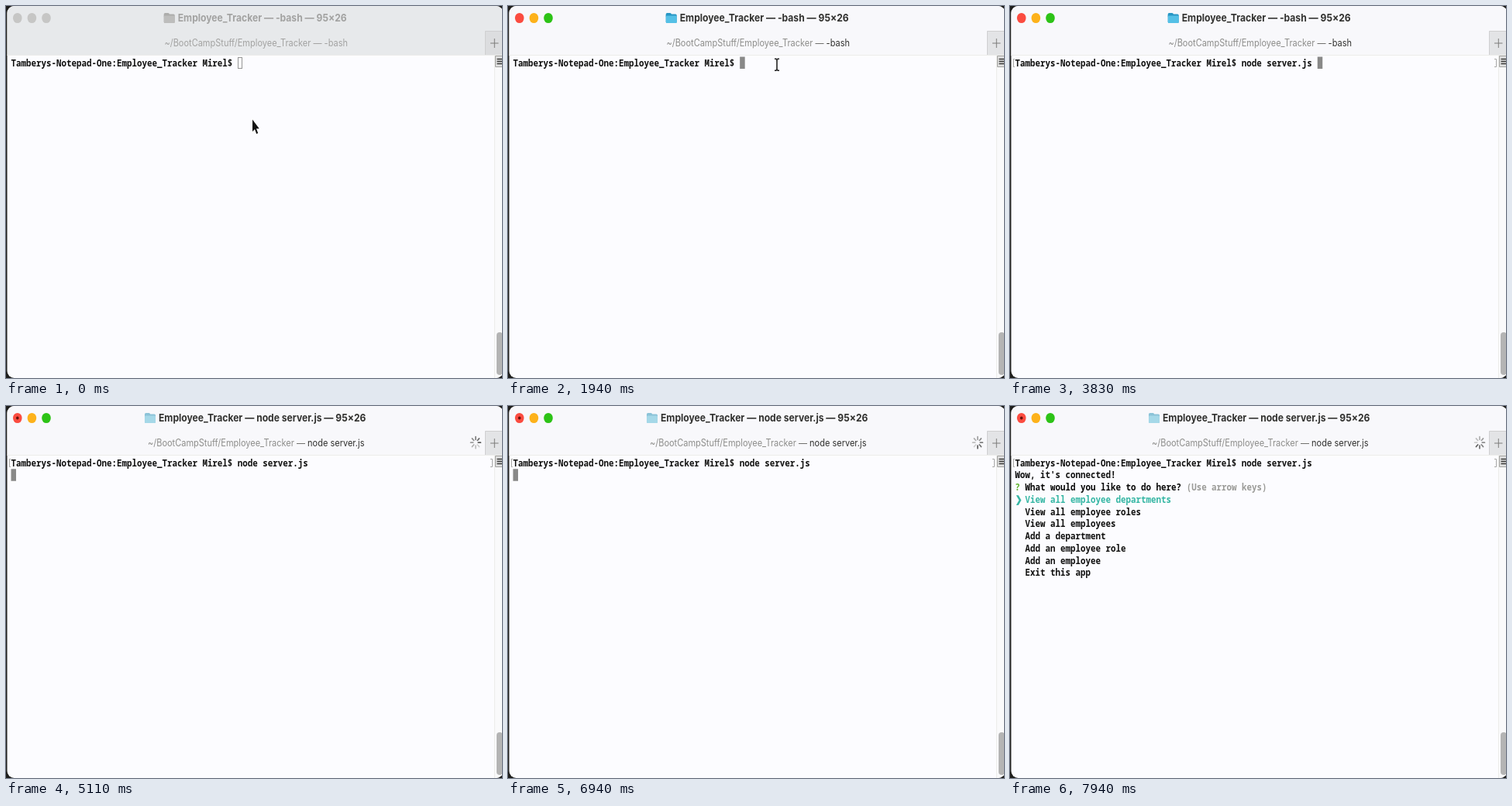
Write an HTML page with a canvas that moves like this. It is 640 by 480 pixels and loops after 8 s.

```html
<!DOCTYPE html>
<html lang="en">
<head>
<meta charset="utf-8">
<title>Terminal</title>
<style>
  html, body { margin: 0; width: 100%; height: 100%; overflow: hidden; background: #1e1e1c; }
  canvas { display: block; }
</style>
</head>
<body>
<canvas id="stage" width="640" height="480"></canvas>
<script>
const ctx = document.getElementById('stage').getContext('2d');
const LOOP = 8000;
const FOCUS = 1060, ENTER = 3830, NEWLINE = 3940, RUN = 4500, MENU = 7330;

const ASPECT = 1.13;
const CELL = 6.504, ROW = 15.75, LEFT = 6.5, TOP = 65.5;
const MONO = '600 10.84px "Noto Sans Mono", monospace';
const MONO_BOLD = '800 10.84px "Noto Sans Mono", monospace';
const TITLE = '700 12.12px Inter, sans-serif';
const TAB = '400 11px Inter, sans-serif';
const INK = '#111110', DIM = '#a3a3a2';

const PROMPT = 'Tamberys-Notepad-One:Employee_Tracker Mirel$ ';
const KEYS = [
  [2230, 'n'], [2420, 'no'], [2600, 'nod'], [2780, 'node'], [2890, 'node '],
  [3060, 'node s'], [3200, 'node se'], [3330, 'node ser'], [3500, 'node server.js ']
];
const CHOICES = [
  'View all employee departments', 'View all employee roles', 'View all employees',
  'Add a department', 'Add an employee role', 'Add an employee', 'Exit this app'
];

function text(str, x, y, font, color) {
  ctx.save();
  ctx.translate(x, y);
  ctx.scale(1, ASPECT);
  ctx.font = font;
  ctx.fillStyle = color;
  ctx.fillText(str, 0, 0);
  ctx.restore();
}

function widthOf(str, font) {
  ctx.font = font;
  return ctx.measureText(str).width;
}

function cells(str, col, row, color = INK, font = MONO) {
  text(str, LEFT + col * CELL, 77.7 + row * ROW, font, color);
}

function rect(x, y, w, h, color) {
  ctx.fillStyle = color;
  ctx.fillRect(x, y, w, h);
}

function round(x, y, w, h, r, color) {
  ctx.fillStyle = color;
  ctx.beginPath();
  ctx.roundRect(x, y, w, h, r);
  ctx.fill();
}

function line(points, color, width = 1) {
  ctx.strokeStyle = color;
  ctx.lineWidth = width;
  ctx.beginPath();
  points.forEach(([x, y]) => ctx.lineTo(x, y));
  ctx.stroke();
}

function oval(x, y, rx, ry, color) {
  ctx.fillStyle = color;
  ctx.beginPath();
  ctx.ellipse(x, y, rx, ry, 0, 0, Math.PI * 2);
  ctx.fill();
}

function folder(x, dark, light) {
  round(x, 9, 7, 6, 1.5, dark);
  round(x, 10.5, 14, 11.5, 1.5, dark);
  round(x, 12.5, 14, 9.5, 1.5, light);
}

function header(active, running) {
  rect(0, 0, 640, 64, active ? '#f8f8fb' : '#e7e9eb');
  rect(618, 32, 22, 32, active ? '#e3e4e6' : '#dcdddf');
  line([[640, 32.5], [618.5, 32.5], [618.5, 64]], '#cfcfd0');
  line([[0, 63.5], [640, 63.5]], '#ececea');
  line([[625, 48], [635.5, 48]], '#7c7c7b');
  line([[630.3, 42], [630.3, 54]], '#7c7c7b');

  const lights = active ? ['#fb4c40', '#fdb21b', '#2dc316'] : Array(3).fill('#c6c6c5');
  lights.forEach((color, i) => oval(14.8 + i * 18.6, 15.5, 5.8, 6.6, color));
  if (running) oval(14.8, 15.5, 1.8, 2, '#67120b');

  const job = running ? 'node server.js' : '-bash';
  const title = `Employee_Tracker — ${job} — 95×26`;
  const titleX = 330.7 - widthOf(title, TITLE) / 2;
  text(title, titleX, 20.3, TITLE, active ? '#333331' : DIM);
  if (!active) folder(titleX - 18, '#adadac', '#bdbdbc');
  else if (running) folder(titleX - 18, '#8cc3d8', '#a5d8e8');
  else folder(titleX - 18, '#2897c5', '#55c0e6');

  const path = '~/BootCampStuff/Employee_Tracker ', tail = '— ';
  const pathW = widthOf(path, TAB), tailW = widthOf(tail, TAB);
  const tabX = 322.7 - (pathW + tailW + widthOf(job, TAB)) / 2;
  text(path, tabX, 52.2, TAB, active ? '#8e8e8c' : DIM);
  text(tail, tabX + pathW, 52.2, TAB, active ? '#70706e' : DIM);
  text(job, tabX + pathW + tailW, 52.2, TAB, active ? '#333331' : DIM);
}

function spinner(t) {
  const step = Math.floor(t / 105);
  ctx.lineCap = 'round';
  for (let i = 0; i < 8; i++) {
    const a = i * Math.PI / 4, age = ((step - i) % 8 + 8) % 8;
    const shade = 95 + age * 16;
    const at = r => [606 + Math.cos(a) * r * 0.92, 47.2 + Math.sin(a) * r * 1.08];
    line([at(3.6), at(7)], `rgb(${shade},${shade},${shade})`, 1.7);
  }
  ctx.lineCap = 'butt';
}

function scrollbar() {
  rect(630, 64, 10, 416, '#fafafb');
  line([[630.5, 64], [630.5, 480]], '#ececea');
  rect(631, 64, 9, 14, '#e0e0e0');
  line([[640, 64.5], [631.5, 64.5], [631.5, 78.5], [640, 78.5]], '#a2a2a0');
  for (const y of [68.5, 71.5, 74.5]) line([[633.5, y], [640, y]], '#3a3a38', 1.5);
  round(633, 421, 8, 55, 4, '#b4b4b4');
}

function caret(col, row, active) {
  const x = LEFT + col * CELL, y = TOP + row * ROW;
  if (active) return rect(x, y, CELL, 15.5, '#898988');
  ctx.strokeStyle = '#959594';
  ctx.lineWidth = 1;
  ctx.strokeRect(Math.round(x) + 0.5, Math.round(y) + 0.5, 5, 14);
}

function menu() {
  cells("Wow, it's connected!", 0, 1);
  cells('?', 0, 2, '#5fb52c', MONO_BOLD);
  cells('What would you like to do here?', 2, 2, '#080808', MONO_BOLD);
  cells('(Use arrow keys)', 34, 2, '#9b9b98');
  cells('❯', 0, 3, '#35b6a4');
  CHOICES.forEach((choice, i) => cells(choice, 2, 3 + i, i ? INK : '#35b6a4'));
}

function arrow(x, y) {
  ctx.save();
  ctx.translate(x, y);
  ctx.beginPath();
  [[0, 0], [0, 15.5], [3, 12.5], [5.2, 18.5], [7.2, 17.5], [5, 11.8], [8.8, 11.8]]
    .forEach(([px, py]) => ctx.lineTo(px, py));
  ctx.closePath();
  ctx.strokeStyle = '#fff';
  ctx.lineWidth = 2;
  ctx.stroke();
  ctx.fillStyle = '#111';
  ctx.fill();
  ctx.restore();
}

function beam(x, y) {
  line([[x, y - 6], [x, y + 6]], '#222', 1.6);
  for (const dir of [-1, 1]) {
    const edge = y + dir * 7.5, inner = y + dir * 6;
    line([[x - 3, edge], [x - 1, edge], [x, inner], [x + 1, edge], [x + 3, edge]], '#222', 1.4);
  }
}

function pointer(t) {
  if (t >= KEYS[0][0]) return;
  if (t >= FOCUS) return beam(347, 75.7);
  const steps = t < 60 ? 0 : Math.min(3, 1 + Math.floor((t - 60) / 55));
  arrow(318 + 29 * steps / 3, 146.5 - 71 * steps / 3);
}

function draw(t) {
  const active = t >= FOCUS, running = t >= RUN;
  const typed = KEYS.reduce((now, [at, str]) => t >= at ? str : now, '');

  rect(0, 0, 640, 480, '#1e1e1c');
  ctx.save();
  ctx.beginPath();
  ctx.roundRect(1.5, 0, 640, 480, 9);
  ctx.clip();
  rect(0, 0, 640, 480, '#fcfcff');
  header(active, running);
  scrollbar();
  if (running) spinner(t);

  cells(PROMPT + typed, 0, 0);
  if (t >= ENTER) {
    line([[6, 68.5], [4.5, 68.5], [4.5, 78.5], [6, 78.5]], '#a8a8a6');
    line([[625, 68.5], [627.5, 68.5], [627.5, 78.5], [625, 78.5]], '#a8a8a6');
  }
  if (t >= MENU) menu();
  else if (t >= NEWLINE) caret(0, 1, true);
  else caret(PROMPT.length + typed.length, 0, active);
  pointer(t);
  ctx.restore();
}

function tick() {
  draw(performance.now() % LOOP);
  requestAnimationFrame(tick);
}
tick();
</script>
</body>
</html>
```
